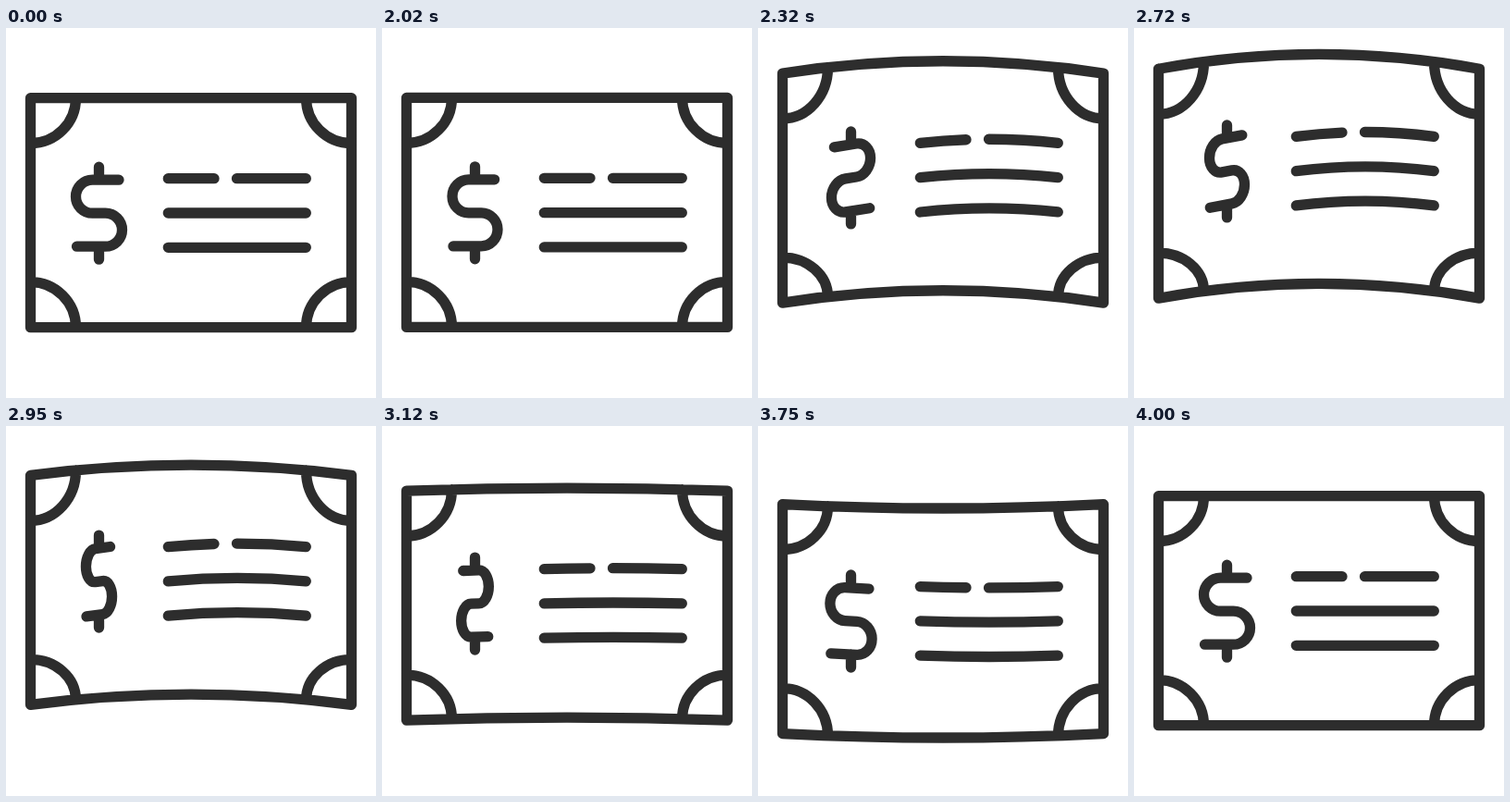
Recreate the animation shown at these times as an HTML page. Size 400x400 px, loop 4020 ms.

```html
<!DOCTYPE html>
<html lang="en">
<head>
<meta charset="utf-8">
<title>Waving banknote</title>
<style>
  html, body { margin: 0; width: 100%; height: 100%; overflow: hidden; background: #fff; }
  svg { display: block; width: 100%; height: 100%; }
  path {
    fill: none; stroke: #2d2d2d; stroke-width: 11.3;
    stroke-linecap: round; stroke-linejoin: round; vector-effect: non-scaling-stroke;
  }
</style>
</head>
<body>
<svg viewBox="0 0 400 400">
  <path id="bill"/>
  <path id="lines"/>
  <path id="dollar" d="M21.5 -36H-7A18 18 0 0 0 -7 0H7A18 18 0 0 1 7 36H-24M0 -50V-36M0 36V50"/>
</svg>
<script>
const LOOP = 4020;
const LEFT = 26.5, RIGHT = 373.5, TOP = 75.7, BOTTOM = 323.7, RADIUS = 49;

// [time in ms, value]
const WAVE = [[2000, 0], [2320, -.83], [2520, -.98], [2620, -1], [2720, -.985], [2800, -.94],
  [2950, -.7], [3070, -.345], [3120, -.18], [3280, .3], [3450, .46], [3530, .5], [3620, .465], [4000, 0]];
const SPIN = [[2000, 0], [2020, 11], [2320, 147], [2720, 319], [3120, 486], [3450, 623], [4000, 720]];

const [bill, lines, dollar] = ['bill', 'lines', 'dollar'].map(id => document.getElementById(id));

// Smooth curve through the keys, at rest at both ends
function sample(keys, t) {
  const last = keys.length - 1;
  if (t <= keys[0][0]) return keys[0][1];
  if (t >= keys[last][0]) return keys[last][1];
  const slope = i => i === 0 || i === last ? 0
    : (keys[i + 1][1] - keys[i - 1][1]) / (keys[i + 1][0] - keys[i - 1][0]);
  const i = keys.findIndex(k => k[0] > t) - 1;
  const [t0, a] = keys[i], [t1, b] = keys[i + 1];
  const span = t1 - t0, p = (t - t0) / span, q = 1 - p;
  return a * (1 + 2 * p) * q * q + b * (3 - 2 * p) * p * p
    + span * p * q * (slope(i) * q - slope(i + 1) * p);
}

// Quadratic segment that follows the parabola y + bend(x)
function curve(x1, x2, y, bend) {
  const a = bend(x1), b = bend(x2), mid = (x1 + x2) / 2;
  return `M${x1} ${y + a}Q${mid} ${y + 2 * bend(mid) - (a + b) / 2} ${x2} ${y + b}`;
}

function corner(x, y, dx, dy, bend) {
  const y1 = y + dy + bend(x), x2 = x + dx, y2 = y + bend(x2);
  return `M${x} ${y1}A${RADIUS} ${Math.abs(y2 - y1)} 0 0 ${dx * dy > 0 ? 0 : 1} ${x2} ${y2}`;
}

function draw(now) {
  const t = now % LOOP;
  const wave = sample(WAVE, t);
  const lift = wave * (wave < 0 ? 46 : 39);
  const edge = x => wave * (48 - 16 * ((x - 200) / 173.5) ** 2);
  const text = x => lift + wave * 5 * (1 - ((x - 250) / 75) ** 2);

  const r = RADIUS, side = edge(LEFT);
  bill.setAttribute('d',
    curve(LEFT, RIGHT, TOP, edge) + `V${BOTTOM + side}` +
    curve(LEFT, RIGHT, BOTTOM, edge) + `M${LEFT} ${BOTTOM + side}V${TOP + side}` +
    corner(LEFT, TOP, r, r, edge) + corner(RIGHT, TOP, -r, r, edge) +
    corner(LEFT, BOTTOM, r, -r, edge) + corner(RIGHT, BOTTOM, -r, -r, edge));

  lines.setAttribute('d',
    curve(175.3, 225, 162.7, text) + curve(249.5, 324.3, 162.7, text) +
    curve(175.3, 324.3, 200, text) + curve(175.3, 324.3, 237.3, text));

  const turn = Math.cos(sample(SPIN, t) * Math.PI / 180);
  const skew = turn * wave * .19;
  dollar.setAttribute('transform', `matrix(${turn} ${skew} 0 1 100.5 ${200.2 + lift})`);
}

const start = performance.now();
function tick() {
  draw(performance.now() - start);
  requestAnimationFrame(tick);
}
tick();
</script>
</body>
</html>
```
